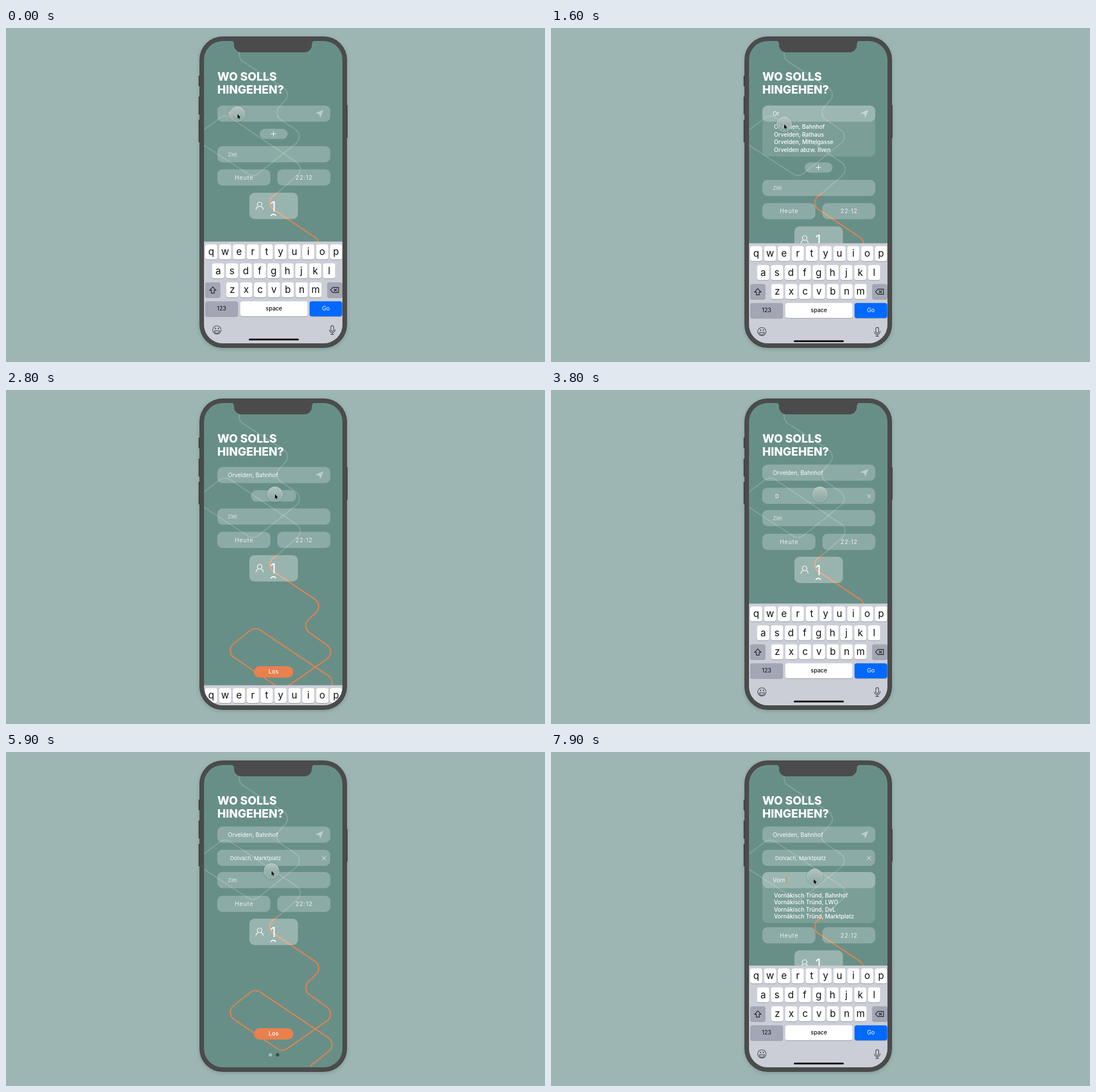
Animation, 950 px wide and 590 px high, one loop 8 s. Source, as an HTML page with a canvas:

```html
<!DOCTYPE html>
<html lang="de">
<head>
<meta charset="utf-8">
<title>Wo solls hingehen?</title>
<style>
html, body { margin: 0; width: 100%; height: 100%; overflow: hidden; background: #9db6b3; }
canvas { display: block; }
</style>
</head>
<body>
<canvas id="stage" width="950" height="590"></canvas>
<script>
const ctx = document.getElementById('stage').getContext('2d');
const LOOP = 8000;
const ORANGE = '#e9804d';
const white = alpha => `rgba(255,255,255,${alpha})`;

const ramp = (t, start, duration) => {
  const u = Math.min(1, Math.max(0, (t - start) / duration));
  return u * u * (3 - 2 * u);
};
const mix = (a, b, p) => a + (b - a) * p;

// Latest value of a list of [time, value] steps.
const stepAt = (t, steps) => steps.reduce((value, [at, next]) => (t >= at ? next : value), '');

function box(x, y, w, h, r, fill) {
  ctx.beginPath();
  ctx.roundRect(x, y, w, h, r);
  ctx.fillStyle = fill;
  ctx.fill();
}

function label(str, x, y, { size = 10, weight = 400, color = '#fff', align = 'left', spacing = 0 } = {}) {
  ctx.font = `${weight} ${size}px Inter, sans-serif`;
  ctx.letterSpacing = spacing + 'px';
  ctx.textAlign = align;
  ctx.fillStyle = color;
  ctx.fillText(str, x, y);
  return ctx.measureText(str).width;
}

function strokeLines(color, width, ...lines) {
  ctx.beginPath();
  for (const [first, ...rest] of lines) {
    ctx.moveTo(...first);
    rest.forEach(p => ctx.lineTo(...p));
  }
  ctx.strokeStyle = color;
  ctx.lineWidth = width;
  ctx.stroke();
}

function route(points, color) {
  ctx.beginPath();
  ctx.moveTo(...points[0]);
  for (let i = 1; i < points.length - 1; i++) ctx.arcTo(...points[i], ...points[i + 1], 15);
  ctx.lineTo(...points.at(-1));
  ctx.strokeStyle = color;
  ctx.lineWidth = 2;
  ctx.stroke();
}

const ROUTES = [
  [[[411, 43], [411, 55], [504, 115], [470, 152], [527, 191], [436, 264], [349, 207]], white(.17)],
  [[[349, 180], [386, 152], [528, 248], [480, 290]], white(.17)],
  [[[480, 290], [454, 309], [560, 380], [520, 418], [583, 463], [487, 530], [385, 461],
    [439, 418], [585, 516], [536, 555]], ORANGE]
];

const LISTS = {
  start: { first: 41, pitch: 13.7, rows: ['Orvelden, Bahnhof', 'Orvelden, Rathaus', 'Orvelden, Mittelgasse', 'Orvelden abzw. Ilven'] },
  stop: { first: 42, pitch: 12.3, rows: ['Dolvach Marktplatz', 'Dolvach Dunkelfurt', 'Dolvach Tründerstr. Kreisel', 'Dolvach-Hain, Mühlenwiese'] },
  goal: { first: 45, pitch: 12.4, rows: ['Vornäkisch Tründ, Bahnhof', 'Vornäkisch Tründ, LWO', 'Vornäkisch Tründ, DvL', 'Vornäkisch Tründ, Marktplatz'] }
};

function suggestions({ first, pitch, rows }, top, open, unfold) {
  if (open <= 0) return;
  const height = mix(28.5, 90, open);
  ctx.save();
  box(372.5, top, 199, height, 9, white(.13));
  ctx.clip();
  ctx.globalAlpha = open;
  rows.forEach((row, i) =>
    label(row, 393, top + first + pitch * Math.min(i, unfold * 3), { weight: 500 }));
  ctx.restore();
}

function fieldText(value, placeholder, x, y, { size = 10, caret, alpha = .7 } = {}) {
  const width = label(value || placeholder, x, y, { size: value ? size : 9.5, color: white(value ? .95 : alpha) });
  if (caret) box(x + (value ? width + .5 : -.5), y - 9.5, 1, 12, 0, '#e8735a');
}

function pill(x, top, w, text) {
  box(x, top, w, 28.5, 9, white(.25));
  label(text, x + w / 2 + .5, top + 18, { align: 'center', spacing: 1, color: white(.85) });
}

function passengers(top) {
  box(429, top, 85.5, 46.5, 9, white(.33));
  ctx.strokeStyle = '#fff';
  ctx.lineWidth = 1.2;
  ctx.beginPath();
  ctx.arc(447, top + 20.5, 4, 0, 7);
  ctx.moveTo(440.5, top + 30);
  ctx.quadraticCurveTo(441, top + 25.5, 444.5, top + 24.5);
  ctx.moveTo(449.5, top + 24.5);
  ctx.quadraticCurveTo(453, top + 25.5, 453.5, top + 30);
  ctx.stroke();
  label('1', 471, top + 32.5, { size: 24, align: 'center' });
  ctx.lineWidth = 2;
  ctx.beginPath();
  ctx.arc(471.2, top + 42.5, 4.5, Math.PI * 1.12, Math.PI * 1.88);
  ctx.stroke();
}

function key(x, y, w, text, { size = 17, fill = '#fff', color = '#111', weight = 400 } = {}) {
  box(x, y + 1, w, 26.5, 4, '#9699a2');
  box(x, y, w, 26.5, 4, fill);
  label(text, x + w / 2, y + 13 + size * .34, { size, color, weight, align: 'center' });
}

function keyboard(top) {
  if (top > 557) return;
  ctx.save();
  ctx.translate(0, top);
  box(349, 0, 244, 182, 0, '#cbced6');
  [['qwertyuiop', 351, 5], ['asdfghjkl', 363.2, 38.5], ['zxcvbnm', 388.2, 72]].forEach(([chars, x, y]) =>
    [...chars].forEach((c, i) => key(x + i * 24.45, y, 21.4, c)));
  const gray = { fill: '#a3a6b4', size: 10 };
  key(351, 72, 27, '', gray);
  key(566, 72, 27, '', gray);
  key(351, 105.5, 58, '123', gray);
  key(413, 105.5, 118.5, 'space', { size: 10, weight: 500 });
  key(535, 105.5, 57.5, 'Go', { size: 10, fill: '#0169ff', color: '#fff' });

  const ink = '#222';
  strokeLines(ink, 1.2,
    [[364.5, 80], [370, 86], [367, 86], [367, 91], [362, 91], [362, 86], [359, 86], [364.5, 80], [370, 86]],
    [[572, 85.5], [576, 81], [586, 81], [586, 90], [576, 90], [572, 85.5], [576, 81]],
    [[578, 83.5], [583, 88]], [[583, 83.5], [578, 88]]);

  // Smiley and microphone
  ctx.strokeStyle = '#4b4d52';
  ctx.beginPath();
  ctx.arc(371.7, 156, 7.3, 0, 7);
  ctx.moveTo(376, 157.5);
  ctx.arc(371.7, 157.5, 4.3, 0, Math.PI);
  ctx.closePath();
  ctx.roundRect(572.5, 148.5, 5, 10, 2.5);
  ctx.moveTo(580, 155);
  ctx.arc(575, 156, 5, 0, Math.PI);
  ctx.moveTo(575, 161);
  ctx.lineTo(575, 164);
  ctx.moveTo(572, 164);
  ctx.lineTo(578, 164);
  ctx.stroke();
  box(368.3, 152, 2, 3, 1, '#4b4d52');
  box(373.3, 152, 2, 3, 1, '#4b4d52');
  box(428, 171.5, 88, 3, 1.5, '#050505');
  ctx.restore();
}

function pointer(t) {
  const a = ramp(t, 1000, 400), b = ramp(t, 1900, 700), c = ramp(t, 4900, 700), d = ramp(t, 5920, 330);
  const x = 408 + 3 * a + 63 * b - 6 * c - 3 * d;
  const y = 152 + 18 * a + 14 * b + 26 * c + 9.5 * d;
  const shade = ctx.createLinearGradient(0, y - 13, 0, y + 13);
  shade.addColorStop(0, 'rgba(190,204,200,.9)');
  shade.addColorStop(1, 'rgba(150,177,171,.7)');
  ctx.save();
  ctx.shadowColor = 'rgba(30,60,55,.35)';
  ctx.shadowBlur = 4;
  ctx.shadowOffsetY = 1;
  box(x - 13.3, y - 13.3, 26.6, 26.6, 13.3, shade);
  ctx.restore();
  ctx.strokeStyle = white(.25);
  ctx.lineWidth = 1;
  ctx.stroke();
  if (t >= 3600 && t < 4900) return;

  const drift = ramp(t, 6800, 500);
  ctx.save();
  ctx.translate(x - 2 * drift, y + 5 * drift);
  ctx.beginPath();
  [[0, 0], [0, 8], [1.8, 6.4], [3, 9], [4.3, 8.4], [3.2, 6], [5.6, 5.8]].forEach(p => ctx.lineTo(...p));
  ctx.closePath();
  ctx.strokeStyle = white(.5);
  ctx.stroke();
  ctx.fillStyle = '#0a0a0a';
  ctx.fill();
  ctx.restore();
}

function phoneBody() {
  const edge = '#424343';
  [[339.5, 84, 19], [339.5, 121, 32], [339.5, 162, 40], [599, 136, 58]].forEach(([x, y, h]) => box(x, y, 3, h, 1, edge));
  ctx.save();
  ctx.shadowColor = 'rgba(40,60,60,.25)';
  ctx.shadowBlur = 6;
  ctx.shadowOffsetY = 2;
  box(341, 15, 260, 550, 41, edge);
  ctx.restore();
  box(342, 16, 258, 548, 40, '#4b4b4b');
}

function notch() {
  ctx.beginPath();
  ctx.moveTo(396, 22);
  ctx.quadraticCurveTo(402, 23, 402, 29);
  ctx.arcTo(402, 43, 416, 43, 13);
  ctx.arcTo(539, 43, 539, 29, 13);
  ctx.lineTo(539, 29);
  ctx.quadraticCurveTo(539, 23, 545, 22);
  ctx.fillStyle = '#4b4b4b';
  ctx.fill();
}

function form(t) {
  const startOpen = ramp(t, 450, 350) - ramp(t, 1600, 200);
  const stopOpen = ramp(t, 4250, 400) - ramp(t, 5690, 200);
  const goalOpen = ramp(t, 7580, 300);
  const added = ramp(t, 2700, 350);
  const push = 59.5 * startOpen;
  const lower = push + 56 * stopOpen;
  const keysUp = 1 - ramp(t, 1585, 210) + ramp(t, 2700, 350) - ramp(t, 5690, 210) + ramp(t, 6250, 300);

  label('WO SOLLS', 372.5, 93, { size: 20, weight: 800 });
  label('HINGEHEN?', 372.5, 116, { size: 20, weight: 800 });

  // Start
  const startTop = mix(137, 131.7, added);
  suggestions(LISTS.start, startTop, startOpen, 1);
  box(372.5, startTop, 199, 28.5, 9, white(.25));
  fieldText(stepAt(t, [[400, 'O'], [600, 'Or'], [1640, 'Orvelden, Bahnhof']]), 'Start', 391, startTop + 18, { caret: t < 800 });
  ctx.beginPath();
  [[559.5, 7.5], [545.5, 13.5], [552, 15.2], [554, 21.5]].forEach(([x, y]) => ctx.lineTo(x, startTop + y));
  ctx.fillStyle = white(.42);
  ctx.fill();

  // The plus button grows into the stopover field
  const width = mix(49, 199, added), height = mix(18, 28.5, added);
  const stopTop = mix(178, 172.7, added) + push;
  suggestions(LISTS.stop, stopTop, stopOpen, Math.min(1, Math.max(0, (t - 4450) / 340)));
  box(471.7 - width / 2, stopTop, width, height, 9, white(.25));
  if (added < .2) {
    const y = stopTop + 9;
    strokeLines(white(.9 * (1 - added * 5)), 1, [[467, y], [476, y]], [[471.5, y - 4.5], [471.5, y + 4.5]]);
  }
  if (added > .8) {
    const y = stopTop + 14.8;
    strokeLines(white((added - .8) * 4.5), 1, [[557.5, y - 3], [563.5, y + 3]], [[563.5, y - 3], [557.5, y + 3]]);
  }
  fieldText(stepAt(t, [[3600, 'D'], [4000, 'Do'], [4200, 'Dol'], [5740, 'Dolvach, Marktplatz']]), '', 395, stopTop + 18.3,
    { size: 9.5, caret: t >= 3400 && t < 5690 });

  // Destination, date, time and passengers
  const goalTop = mix(208.7, 212, added) + lower;
  suggestions(LISTS.goal, goalTop, goalOpen, goalOpen);
  box(372.5, goalTop, 199, 28.5, 9, white(.25));
  fieldText(stepAt(t, [[7100, 'V'], [7300, 'Vo'], [7500, 'Vor'], [7600, 'Vorn']]), 'Ziel', 391, goalTop + 18,
    { caret: t >= 6300, alpha: .7 - .35 * stopOpen });
  const rowTop = mix(249.7, 254, added) + lower + 55.5 * goalOpen;
  pill(372.5, rowTop, 93.5, 'Heute');
  pill(478.2, rowTop, 93.5, '22:12');
  passengers(mix(291, 294.5, added) + lower + 56 * goalOpen);

  box(437, 488, 69.5, 20, 10, ORANGE);
  label('Los', 471.7, 501.3, { weight: 500, align: 'center', spacing: .3 });
  box(463, 532, 6, 6, 3, white(.4));
  box(475.7, 532, 6, 6, 3, '#38504c');
  keyboard(mix(558, 377.3, keysUp));
}

function draw(now) {
  const t = now % LOOP;
  ctx.fillStyle = '#9db6b3';
  ctx.fillRect(0, 0, 950, 590);
  phoneBody();
  ctx.save();
  box(349, 23, 244, 534, 33, '#678f88');
  ctx.clip();
  ROUTES.forEach(([points, color]) => route(points, color));
  form(t);
  pointer(t);
  ctx.restore();
  notch();
  requestAnimationFrame(draw);
}
requestAnimationFrame(draw);
</script>
</body>
</html>
```
